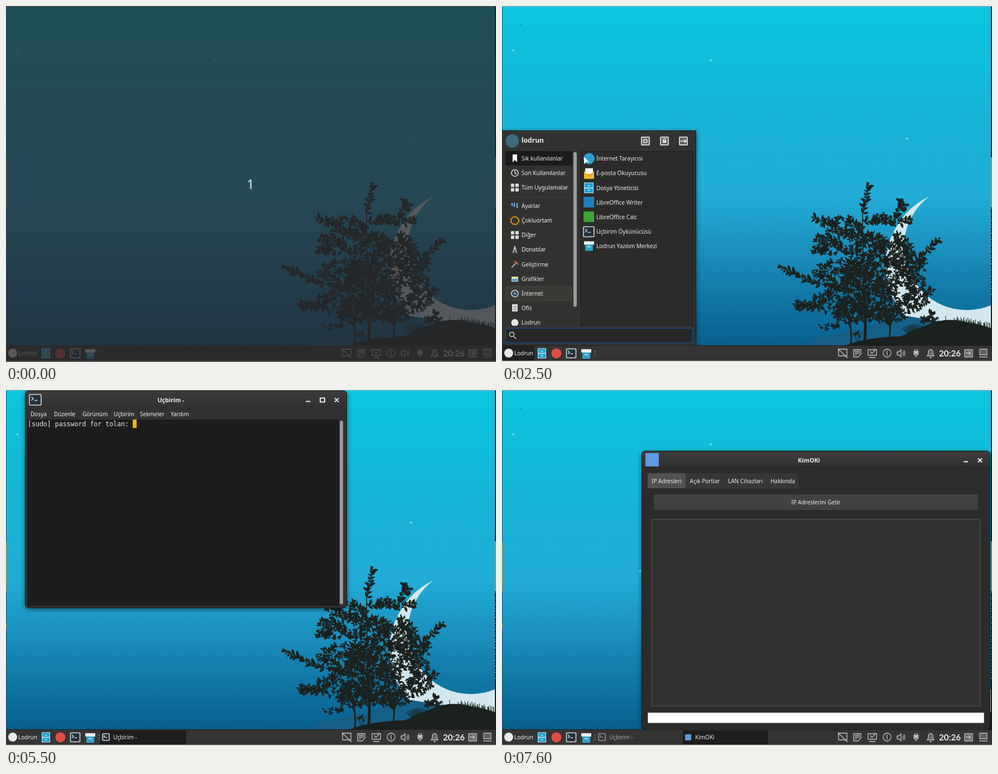
An HTML page that plays this animation: 878x638 px, repeating every 8 s.

```html
<!DOCTYPE html>
<html lang="tr">
<head>
<meta charset="utf-8">
<title>Desktop</title>
<style>
html, body { margin: 0; width: 100%; height: 100%; overflow: hidden; background: #0ac6df; }
svg { display: block; width: 878px; height: 638px; }
text { font: 10px "Noto Sans", "Open Sans", sans-serif; fill: #eee; white-space: pre; }
.b { font-weight: 700; font-size: 10.6px; }
.m { text-anchor: middle; }
.mono { font: 11.57px "DejaVu Sans Mono", monospace; }
.shadow { filter: drop-shadow(0 2px 4px rgba(0,0,0,.5)); }
</style>
</head>
<body>
<svg id="stage" viewBox="0 0 878 638"></svg>
<script>
const rect = (x, y, w, h, fill, more = '') => `<rect x="${x}" y="${y}" width="${w}" height="${h}" fill="${fill}" ${more}/>`;
const disc = (x, y, r, fill) => `<circle cx="${x}" cy="${y}" r="${r}" fill="${fill}"/>`;
const shape = (d, fill) => `<path d="${d}" fill="${fill}"/>`;
const stroke = (d, color, w = 1.3) => `<path d="${d}" fill="none" stroke="${color}" stroke-width="${w}"/>`;
const text = (x, y, s, more = '') => `<text x="${x}" y="${y + 3.7}" ${more}>${s}</text>`;
const group = (id, body, more = '') => `<g id="${id}" ${more}>${body}</g>`;

let seed = 90210;
const rnd = (a = 0, b = 1) => {
  seed = (seed * 16807) % 2147483647;
  return a + (b - a) * seed / 2147483647;
};

// ---- wallpaper ----
const dark = '#1b211e';

function leaf(x, y, a, len) {
  const c = Math.cos(a) * len, s = Math.sin(a) * len, k = .42;
  const pt = (u, v) => `${(c * u - s * v).toFixed(1)} ${(s * u + c * v).toFixed(1)}`;
  return `M${x.toFixed(1)} ${y.toFixed(1)}q${pt(.45, k)} ${pt(1, 0)}q${pt(-.55, -k)} ${pt(-1, 0)}`;
}

function tuft(x, y, n, len) {
  let d = '';
  for (let i = 0; i < n; i++) d += leaf(x, y, rnd(0, 6.28), rnd(.7, 1.3) * len);
  return d;
}

function twig([x0, y0, x1, y1]) {
  const len = Math.hypot(x1 - x0, y1 - y0), a = Math.atan2(y1 - y0, x1 - x0);
  let d = leaf(x1, y1, a, 7);
  for (let s = 0; s < len; s += 4) {
    const u = s / len, x = x0 + (x1 - x0) * u, y = y0 + (y1 - y0) * u;
    for (const side of [-1, 1]) d += leaf(x, y, a + side * rnd(.1, 1.5), rnd(5, 13));
  }
  return shape(d, dark) + stroke(`M${x0} ${y0}L${x1} ${y1}`, dark, 1.2);
}

function crown() {
  const blobs = [
    [608, 394, 38, 16], [682, 384, 36, 10], [582, 430, 24, 16], [640, 426, 45, 25],
    [705, 435, 36, 28], [608, 480, 50, 26], [670, 480, 60, 30], [730, 463, 30, 22],
    [602, 528, 44, 24], [665, 528, 55, 28], [735, 527, 28, 19], [585, 573, 17, 4],
    [692, 554, 36, 12], [545, 536, 20, 9], [738, 497, 22, 18], [630, 556, 34, 14]
  ];
  let d = '';
  for (const [cx, cy, rx, ry] of blobs)
    for (let n = rx * ry * .12; n > 0; n--) {
      const a = rnd(0, 6.28), r = Math.sqrt(rnd());
      d += tuft(cx + rx * r * Math.cos(a), cy + ry * r * Math.sin(a), 4, 6);
    }
  return shape(d, dark);
}

function grass() {
  let d = '';
  for (let x = 812; x < 876; x += 1.2)
    d += `M${x} ${564 + (x - 800) * .2}l${rnd(-4, 4)} ${-rnd(4, 12)}`;
  for (let i = -1; i <= 1; i += .1)
    d += `M${738 + i * 7} 590l${i * 15} ${-20 + i * i * 8}`;
  d += 'M782 568v-10M795 565v-10M637 604l-7 -20M637 604l6 -18';
  return stroke(d, dark, 1);
}

function wallpaper() {
  const twigs = [
    [647, 372, 656, 322], [702, 380, 716, 351], [600, 394, 560, 380], [592, 412, 564, 417],
    [570, 500, 500, 468], [560, 543, 526, 535], [745, 455, 781, 419], [750, 521, 772, 510],
    [710, 360, 724, 358], [715, 388, 731, 384], [580, 440, 560, 441]
  ];
  const plants = tuft(768, 554, 9, 12) + tuft(758, 562, 7, 10) + tuft(775, 563, 6, 8) + tuft(638, 588, 5, 8);
  return `<defs><linearGradient id="sky" x2="0" y2="1">
      <stop stop-color="#0ac6df"/><stop offset=".33" stop-color="#18b4d8"/>
      <stop offset=".56" stop-color="#22acd6"/><stop offset=".72" stop-color="#1a8fbd"/>
      <stop offset="1" stop-color="#075f8d"/></linearGradient>
    <linearGradient id="bar" x2="0" y2="1"><stop stop-color="#3c3d3b"/><stop offset="1" stop-color="#303030"/></linearGradient></defs>`
    + rect(0, 0, 878, 609, 'url(#sky)')
    + [[20, 79], [374, 97], [725, 237], [247, 324]].map(([x, y]) => disc(x + .5, y + .5, 2, '#7ed5e8')).join('')
    + rect(33, 33, 1, 1, '#123')
    + shape('M766 341A137 137 0 0 0 878 591V535.6A113 113 0 0 1 766 341Z', '#d2e8ee')
    + shape('M543 608Q580 584 640 583Q690 556 728 556L790 566L878 608Z', '#165f86')
    + shape('M616 608Q650 594 715 592Q745 577 775 567Q800 558 835 567Q860 571 878 578V609Z', dark)
    + stroke('M648 520L646 372M649 540L600 480M650 520L715 440', dark, 1.5)
    + stroke('M650 602Q653 560 648 510', dark, 5)
    + stroke('M625 606Q628 580 620 555M694 596Q697 572 694 550M694 572l14 -20M694 572l-12 -18', dark, 3)
    + crown() + twigs.map(twig).join('') + shape(plants, dark) + grass()
    + rect(0, 0, 878, 1, '#9aa3a6')
    + rect(0, 1, 1, 272, '#0b4f78') + rect(0, 273, 1, 88, '#a07c3c') + rect(0, 361, 1, 248, '#15405f') + rect(0, 418, 1, 10, '#a07c3c')
    + rect(876, 1, 2, 270, '#0a1a40') + rect(876, 271, 2, 90, '#c08d3a') + rect(876, 361, 2, 248, '#1d1a20')
    + `<path d="M877 362V520" stroke="#8a5a2a" stroke-width="2" stroke-dasharray="2 5 1 3"/>`;
}

// ---- icons ----
const drawerIcon = (x, y, w, h) => rect(x, y, w, h, '#1c9fd4', 'stroke="#d8edf5"')
  + stroke(`M${x} ${y + h / 2}h${w}M${x + w / 2 - 2} ${y + h * .27}h4M${x + w / 2 - 2} ${y + h * .73}h4`, '#d8edf5', 1.5);
const termIcon = (x, y, w, h) => rect(x, y, w, h, '#23313a', 'stroke="#d3dcdf" stroke-width="1.6" rx="1"')
  + stroke(`M${x + w * .17} ${y + h * .22}l${w * .16} ${h * .17}l${-w * .16} ${h * .17}M${x + w * .42} ${y + h * .56}h${w * .25}`, '#eee');
const shopIcon = (x, y) => rect(x + 2, y + 6, 14, 11, '#28a5c8') + rect(x, y, 18, 6, '#e6ecee') + rect(x + 6, y + 9, 6, 1.5, '#e6ecee');
const tileIcon = (x, y) => [[0, 0], [8, 0], [0, 8], [8, 8]].map(([a, b]) => rect(x + a, y + b, 6, 6, '#ddd')).join('');
const square = (x, y, s, color) => rect(x, y, s, s, color, 'rx="1"');

function tray() {
  const lines = ['M603 615h15v12h-15zM602 614l17 17', 'M630 616h13v8l-5 5h-8zM632 619h9M632 622h9M632 625h4',
    'M656 616h15v10h-15zM658 630h11M660 619l3 4l7 -8', 'M697 622a7 7 0 1 0 -14 0a7 7 0 1 0 14 0M690 618v8',
    'M708 620h3l4 -4v13l-4 -4h-3zM718 619q2 3 0 7M720 617q4 5 0 11', 'M738 619h8v4q0 3 -4 3q-4 0 -4 -3zM740 615v4M744 615v4M742 626v4',
    'M762 627q2 -2 2 -6q0 -5 4 -5t4 5q0 4 2 6zM766 630h4', 'M829 616h14v13h-14zM831 622h8M836 619l4 3.5l-4 3.5', 'M856 615h13v10h-13zM855 629h15'];
  return stroke(lines.join(''), '#c4c4c4')
    + rect(830, 617, 12, 11, '#aaa', 'opacity=".45"') + rect(857, 616, 11, 8, '#888', 'opacity=".5"')
    + rect(764, 618, 8, 9, '#aaa', 'opacity=".4"') + rect(739, 619, 6, 5, '#c4c4c4')
    + `<text x="783" y="628" style="font:700 15.2px Lato,sans-serif">20:26</text>`;
}

const panel = () => rect(0, 608, 878, 28, '#353535') + rect(0, 608, 878, 1, '#202020') + rect(0, 636, 878, 2, '#e4e4e2')
  + group('hover', rect(0, 609, 58, 27, '#222', 'rx="2"'))
  + group('termTask', rect(169, 610, 154, 25, '#1d1d1d', 'rx="2" id="termActive"')
    + group('termLabel', termIcon(173, 616, 12, 12) + text(192, 622, 'Uçbirim -')))
  + group('appTask', rect(324, 610, 153, 25, '#1d1d1d', 'rx="2"') + square(328, 617, 11, '#5b9be0') + text(346, 622, 'KimOKi'))
  + disc(12, 622, 8, '#e8e8e8') + text(22, 622, 'Lodrun')
  + drawerIcon(64.5, 614, 14, 17) + disc(97.5, 622.5, 9, '#dd5144') + termIcon(115.5, 614.5, 17, 16) + shopIcon(142, 615)
  + [618, 622, 626].map(y => rect(165, y, 3, 1, '#888')).join('') + tray();

// ---- start menu ----
const cats = ['Sık kullanılanlar', 'Son Kullanılanlar', 'Tüm Uygulamalar', 'Ayarlar', 'Çokluortam', 'Diğer',
  'Donatılar', 'Geliştirme', 'Grafikler', 'İnternet', 'Ofis', 'Lodrun'];
const catY = i => i < 3 ? 273 + i * 26.2 : 358 + (i - 3) * 26.2;
const catIcons = [
  y => shape(`M19 ${y - 7}h8v14l-4 -4l-4 4z`, '#fff'),
  y => stroke(`M29 ${y}a6 6 0 1 0 -12 0a6 6 0 1 0 12 0M23 ${y - 4}v4l3 2`, '#ddd', 1.6),
  y => tileIcon(16, y - 7),
  y => stroke(`M18 ${y - 5}v5M22 ${y - 5}v7M27 ${y - 5}v9`, '#6aa7e0', 2.5),
  y => stroke(`M20 ${y - 6}h6l4 4v5l-4 4h-6l-4 -4v-5z`, '#e8971e', 1.8),
  y => tileIcon(16, y - 7),
  y => stroke(`M23 ${y - 6}l-3 12M23 ${y - 6}l3 12`, '#c9b8d8', 2),
  y => stroke(`M17 ${y + 6}l9 -9`, '#bbb', 1.8) + stroke(`M21 ${y - 5}q6 0 8 6`, '#d04a3a', 2.5),
  y => rect(17, y - 4, 12, 9, '#e6dcb0') + rect(18, y, 10, 4, '#4a9bd0'),
  y => stroke(`M29 ${y}a6 6 0 1 0 -12 0a6 6 0 1 0 12 0`, '#ddd', 1.6) + disc(23, y, 3, '#3f86cc'),
  y => rect(18, y - 7, 10, 13, '#ddd') + stroke(`M20 ${y - 3}h6M20 ${y}h6M20 ${y + 3}h6`, '#777', 1),
  y => disc(23, y, 6.5, '#e8e8e8')
];

const apps = {
  'İnternet Tarayıcısı': y => disc(156, y, 10, '#2a9fd6') + shape(`M147 ${y + 10}l0 -13l9 9l-5 0z`, '#fff'),
  'E-posta Okuyucusu': y => rect(147, y - 3, 18, 13, '#f2b92c') + rect(149, y - 9, 14, 10, '#f3f1e8') + stroke(`M147 ${y - 2}l9 7l9 -7`, '#d99a1c'),
  'Dosya Yöneticisi': y => drawerIcon(147.5, y - 9, 16, 18),
  'LibreOffice Writer': y => square(146, y - 10, 19, '#1f7fc0'),
  'LibreOffice Calc': y => square(146, y - 10, 19, '#3ea535'),
  'Uçbirim Öykünücüsü': y => termIcon(146, y - 9, 19, 18),
  'Lodrun Yazılım Merkezi': y => shopIcon(147, y - 9),
  'KimOKi': y => square(147, y - 9, 18, '#5b9be0')
};
const appRows = names => names.map((n, i) => apps[n](273.5 + i * 26.2) + text(169, 273.5 + i * 26.2, n)).join('');
const names = Object.keys(apps), favourites = names.slice(0, 7);
const found = ['KimOKi', 'E-posta Okuyucusu', 'Uçbirim Öykünücüsü', 'Lodrun Yazılım Merkezi', 'Dosya Yöneticisi', 'LibreOffice Calc'];

const menu = () => rect(0.5, 223.5, 347, 385, '#323331', 'stroke="#1a1a1a"')
  + disc(18.5, 242, 12, '#3c6a82') + text(35, 241.5, 'lodrun', 'class="b" style="font-size:12px"')
  + [249, 283, 317].map(x => rect(x, 234, 16, 16, '#cfcfcf', 'rx="2"') + rect(x + 2, 236, 12, 12, '#666')).join('')
  + stroke('M260 242a3 3 0 1 0 -6 0a3 3 0 1 0 6 0M289 241v-1a2 2 0 0 1 4 0v1M320 242h10M327 239l3 3l-3 3', '#eee', 1.5) + rect(288, 241, 6, 4, '#eee')
  + rect(141.5, 260.5, 201, 312, '#2b2b2a', 'stroke="#1f1f1f"')
  + rect(128, 262, 6, 277, '#9d9d9b', 'rx="3"')
  + rect(6, 260, 120, 26, '#1b1b1b', 'rx="3" id="chosen"')
  + rect(6.5, 0, 118, 25, '#3a3a37', 'rx="2" stroke="#4a4a45" id="over"')
  + rect(6, 342, 119, 1, '#434341')
  + `<clipPath id="catClip"><rect x="0" y="258" width="128" height="315"/></clipPath>`
  + group('cats', cats.map((c, i) => catIcons[i](catY(i)) + text(35, catY(i), c)).join(''), 'clip-path="url(#catClip)"')
  + group('favs', appRows(favourites)) + group('many', appRows(found)) + group('few', appRows(found.slice(0, 4)))
  + rect(6.5, 577.5, 335, 26, '#262626', 'rx="2" stroke="#184a86" stroke-width="1.4"')
  + stroke('M21.5 588.5a4 4 0 1 0 -8 0a4 4 0 1 0 8 0M20.5 591.5l5 5', '#ccc', 1.6)
  + '<text id="query" x="31" y="594"></text>';

// ---- windows ----
const terminal = () => rect(34.5, 1.5, 576, 389, '#323331', 'rx="6" stroke="#1a1a1a"') + rect(35, 2, 575, 33, 'url(#bar)', 'rx="6"')
  + termIcon(42, 8, 21, 19)
  + group('termChrome', text(295.5, 18, 'Uçbirim -', 'class="b m"')
    + ['Dosya', 'Düzenle', 'Görünüm', 'Uçbirim', 'Sekmeler', 'Yardım'].map((s, i) => text([44, 86, 137, 193, 240, 295][i], 43, s)).join(''))
  + group('termButtons', '<path d="M537.5 20.5h8M563 14.5h8v7h-8zM589 14.5l7 7M596 14.5l-7 7" fill="none" stroke-width="2"/>')
  + rect(38, 53, 559, 334, '#1d1e1c') + rect(598, 55, 6, 329, '#9a9a98', 'rx="3" id="termScroll"')
  + text(39, 61, '[sudo] password for tolan:', 'class="mono"')
  + rect(227, 53, 7, 15, '#f5b50a', 'id="caret"');

const app = () => rect(250.5, 109.5, 624, 499, '#2c2c2b', 'rx="6" stroke="#191919"') + rect(251, 110, 623, 32, 'url(#bar)', 'rx="6"')
  + rect(251, 136, 623, 8, '#2c2c2b')
  + square(257, 113, 24, '#5b9be0') + text(550, 126, 'KimOKi', 'class="b m"')
  + stroke('M827 128.5h8M853 122.5l7 7M860 122.5l-7 7', '#eee', 2)
  + rect(261, 149, 271, 27, '#373736', 'rx="4"') + rect(261, 149, 68, 27, '#51514f', 'rx="4"')
  + ['IP Adresleri', 'Açık Portlar', 'LAN Cihazları', 'Hakkında'].map((s, i) => text([295, 363.5, 436, 503][i], 163, s, 'class="m"')).join('')
  + rect(272, 187, 581, 28, '#424240', 'rx="3"') + text(562.5, 201, 'IP Adreslerini Getir', 'class="m"')
  + rect(268.5, 231.5, 588, 335, '#323230', 'stroke="#555553"')
  + rect(261.5, 578.5, 602, 18, '#fff', 'stroke="#bbb" rx="1"');

const stage = document.getElementById('stage');
stage.innerHTML = wallpaper() + group('menu', menu(), 'class="shadow"') + group('term', terminal(), 'class="shadow"')
  + group('app', app(), 'class="shadow"') + panel()
  + group('dim', rect(0, 0, 878, 638, '#28282c', 'opacity=".75"') + text(438, 324, '1', 'class="m" style="font-size:24px;fill:#d9f3f6"'));

// ---- timeline ----
const el = id => document.getElementById(id);
const show = (id, v) => { el(id).style.opacity = +v; };
const set = (id, o) => { for (const k in o) el(id).setAttribute(k, o[k]); };
const clamp = v => Math.max(0, Math.min(1, v));
const path = [11, 10, 7, 4, 1, 4, 7, 9, 9];

function draw(ms) {
  const t = Math.floor(ms / 100) * 100;
  show('dim', t < 200);
  show('hover', t >= 4000 ? 0 : t >= 1600 ? 1 : clamp((t - 800) / 500) * .5);

  show('menu', t < 1600 || t >= 4000 ? 0 : t === 1600 || t === 3900 ? .5 : 1);
  const typing = t >= 2700, row = path[(t - 1800) / 100];
  show('over', row !== undefined);
  if (row !== undefined) set('over', { y: catY(row) - 12.5 });
  show('chosen', !typing);
  show('cats', typing ? .5 : 1);
  show('favs', !typing);
  show('many', typing && t < 3600);
  show('few', t >= 3600);
  const n = [2700, 2900, 3100, 3300, 3600, 3700].filter(k => t >= k).length;
  el('query').textContent = 'kimoki'.slice(0, n);

  const open = t >= 4300, blurred = t >= 6600, entered = t >= 6100;
  show('term', !open || t >= 7600 ? 0 : t === 7500 ? .5 : 1);
  show('termTask', open);
  show('termActive', !blurred);
  show('termLabel', t >= 7500 ? .6 : 1);
  show('termChrome', blurred ? .6 : 1);
  set('termButtons', { stroke: blurred ? '#151515' : '#eee' });
  set('termScroll', { fill: blurred ? '#51514f' : '#9a9a98' });
  set('caret', blurred
    ? { x: 39.5, y: 66.5, width: 7, height: 14, fill: 'none', stroke: '#f5b50a' }
    : { x: entered ? 39 : 227, y: entered ? 66 : 53, width: 7, height: 15, fill: '#f5b50a', stroke: 'none' });
  show('caret', !(t >= 4900 && t < 5500));

  const fade = clamp((t - 6500) / 400);
  show('app', fade);
  show('appTask', fade);
}

const start = performance.now();
function tick() {
  draw((performance.now() - start) % 8000);
  requestAnimationFrame(tick);
}
tick();
</script>
</body>
</html>
```
